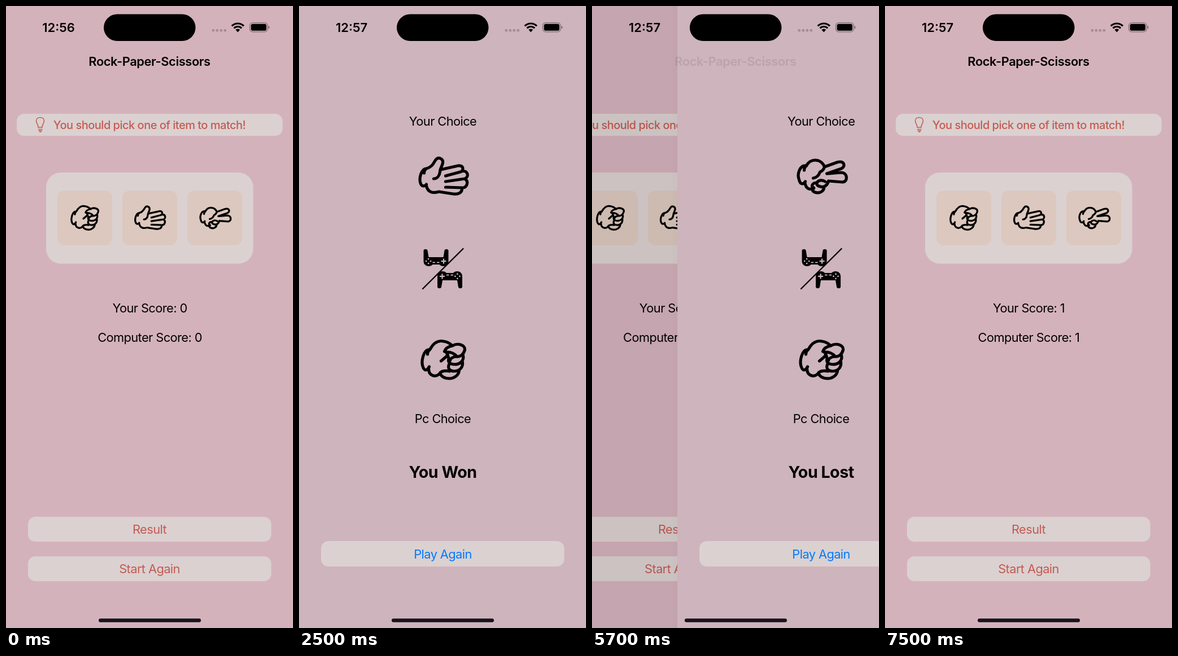
These frames come from a looping animation (508x1102 px, 8000 ms). An HTML page with a canvas:

```html
<!DOCTYPE html>
<html lang="en">
<head>
<meta charset="utf-8">
<title>Rock-Paper-Scissors</title>
<style>
  html, body { margin: 0; width: 100%; height: 100%; overflow: hidden; background: #d4b2bc; }
  canvas { display: block; }
</style>
</head>
<body>
<canvas id="stage" width="508" height="1102"></canvas>
<script>
const W = 508, H = 1102, LOOP = 8000;
const HOME_BG = '#d4b2bc', RESULT_BG = '#ceb4bc', CARD = '#dbd1d1', TILE = '#dcc8be', RED = '#c45b52', BLUE = '#007aff';
const ctx = document.getElementById('stage').getContext('2d');

// Hands are outlines around their own centre, at the size of the result page.
const rock = new Path2D(`M-24-18C-17-31-8-35 0-33C8-32 13-28 16-25C26-31 39-26 38-18C36-10 30-5 24-6C20-11 14-14 6-14
  M16-25C10-24 4-21 2-15C8-13 9-8 3-4L-4 2M6-14C9-8 8-2 12 1M24-6C19-6 15-4 12-1
  M35-8C37 2 29 8 20 8C14 8 9 6 9 0M34 4C35 14 28 20 19 20C12 20 7 16 10 8
  M28 19C27 28 18 33 11 33C2 33-4 29-6 23C-2 19 5 19 11 20M-26 16C-26 28-14 32-6 24
  M-24-18C-35-20-41 4-35 15C-32 20-28 18-25 12M-24-18C-27-16-28-13-28-10`);
const paper = new Path2D(`M-30-14C-18-17-17-26-13-30C-9-35 0-32-1-24C-2-18-6-14-6-8C-7-1-11 4-17 4
  M-5-12L26-19C36-20 37-11 30-8L4-1M32-9C44-12 46 1 38 4L4 9M39 5C45 9 42 20 34 20L4 19
  M33 20C34 29 26 32 18 31L-8 27C-18 30-27 29-30 17
  M-30-14C-39-14-44 4-40 13C-38 18-33 18-30 14M-30-14C-33-12-34-9-34-6`);
const scissors = new Path2D(`M-27-19C-20-33-1-32 5-17L27-25C40-29 43-18 35-14L9-5M12-5L34-7C46-7 47 9 37 10L12 8
  M5-17C3-11 0-9-3-8C-5-2-9 2-15 3M12 8C10 16 4 20-2 18C-8 17-10 14-8 10C-4 6 2 6 6 9
  M-8 11C-17 11-20 18-14 21M4 18C5 26-4 31-12 28C-17 26-18 22-14 20M-30 10C-28 22-22 24-16 21
  M-27-19C-39-21-44-4-40 6C-38 14-33 15-29 9M-27-19C-30-17-31-14-31-11`);
const gamepad = new Path2D(`M-22-13C-21-16-16-16-15-13L-13-1H13L15-13C16-16 21-16 22-13L22 6
  C22 16 10 17 6 12H-6C-10 17-22 16-22 6Z`);
const bulb = new Path2D(`M57 215C57 209 53.5 208 53.5 203.5C53.5 195.5 67.5 195.5 67.5 203.5
  C67.5 208 64 209 64 215ZM57 218.5H64.5M57.5 221H64M59 223H62.5`);

function box(x, y, w, h, r, color) {
  ctx.fillStyle = color;
  ctx.beginPath();
  ctx.roundRect(x, y, w, h, r);
  ctx.fill();
}

function label(str, x, y, { size = 21.8, weight = 400, color = '#000', gap = -0.58, alpha = 1 } = {}) {
  ctx.save();
  ctx.globalAlpha *= alpha;
  ctx.font = `${weight} ${size}px Inter, sans-serif`;
  ctx.letterSpacing = gap + 'px';
  ctx.textAlign = 'center';
  ctx.fillStyle = color;
  ctx.fillText(str, x, y);
  ctx.restore();
}

function hand(path, x, y, scale = 1) {
  ctx.save();
  ctx.translate(x, y);
  ctx.scale(scale, scale);
  ctx.lineWidth = 5.2;
  ctx.lineCap = ctx.lineJoin = 'round';
  ctx.strokeStyle = '#000';
  ctx.stroke(path);
  ctx.restore();
}

function pad(x, y, angle) {
  ctx.save();
  ctx.translate(x, y);
  ctx.rotate(angle);
  ctx.fillStyle = '#000';
  ctx.fill(gamepad);
  ctx.fillStyle = RESULT_BG;
  ctx.fillRect(9, 5, 9, 2.2);
  ctx.fillRect(12.4, 1.6, 2.2, 9);
  ctx.fillRect(-6, 7.5, 4.5, 1.8);
  ctx.fillRect(1.5, 7.5, 4.5, 1.8);
  for (const [dx, dy] of [[-4, 0], [4, 0], [0, -4], [0, 4]]) box(-14.8 + dx, 4.7 + dy, 2.8, 2.8, 1.4, RESULT_BG);
  ctx.restore();
}

const within = (t, from, to) => t >= from && t < to;

const home = (you, computer) => ({
  titled: true,
  draw(t) {
    const dimmed = [false, within(t, 500, 1500), within(t, 4600, 5400)];
    const resultPressed = within(t, 1500, 1700) || within(t, 5400, 5600);
    box(0, 0, W, H, 0, HOME_BG);
    box(19, 191, 470.5, 39, 13, CARD);
    ctx.strokeStyle = RED;
    ctx.lineWidth = 1.6;
    ctx.stroke(bulb);
    label('You should pick one of item to match!', 254, 218, { size: 20, weight: 500, color: RED, gap: -0.5 });
    box(71, 295, 366.5, 161.5, 26, CARD);
    [rock, paper, scissors].forEach((path, i) => {
      ctx.globalAlpha = dimmed[i] ? 0.3 : 1;
      box(91 + 115 * i, 327, 97, 97, 13, TILE);
      hand(path, 139.5 + 115.3 * i, 375.5, 0.63);
    });
    ctx.globalAlpha = 1;
    label('Your Score: ' + you, 254.5, 543);
    label('Computer Score: ' + computer, 254.5, 595);
    box(39, 905, 430.5, 44, 13, CARD);
    label('Result', 254, 935, { color: RED, alpha: resultPressed ? 0.3 : 1 });
    box(39, 975, 430.5, 44, 13, CARD);
    label('Start Again', 254, 1005, { color: RED });
  }
});

const result = (yours, pcs, verdict) => ({
  titled: false,
  draw(t) {
    const pressed = within(t, 3400, 3600) || within(t, 6700, 6900);
    box(0, 0, W, H, 0, RESULT_BG);
    label('Your Choice', 254.5, 212);
    hand(yours, 255.5, 302);
    pad(242.5, 446, 0);
    pad(267, 485, Math.PI);
    ctx.strokeStyle = '#000';
    ctx.lineWidth = 2.4;
    ctx.lineCap = 'round';
    ctx.beginPath();
    ctx.moveTo(219, 501);
    ctx.lineTo(290.5, 430);
    ctx.stroke();
    hand(pcs, 255.5, 627);
    label('Pc Choice', 254.5, 739);
    label(verdict, 254.5, 836, { size: 28.6, weight: 700, gap: -0.5 });
    box(39, 948, 430.5, 45, 13, CARD);
    label('Play Again', 254.5, 979, { color: BLUE, alpha: pressed ? 0.3 : 1 });
  }
});

const views = [home(0, 0), result(paper, rock, 'You Won'), home(1, 0), result(scissors, rock, 'You Lost'), home(1, 1)];
const pushes = [1600, 3617, 5567.5, 6849];

// Critically damped spring: the part of the way still to go.
function remaining(ms) {
  const x = 18.5 * ms / 1000;
  return (1 + x) * Math.exp(-x);
}

function drawView(view, x, t) {
  ctx.save();
  ctx.translate(x, 0);
  view.draw(t);
  ctx.restore();
}

const title = (x, alpha) => label('Rock-Paper-Scissors', 254 + x, 106, { weight: 600, gap: -0.38, alpha });

function statusBar(t) {
  label(t < 2500 ? '12:56' : '12:57', 93, 46, { size: 22, weight: 600, gap: 0 });
  box(173, 14.5, 162.5, 47.5, 23.75, '#000');
  for (let i = 0; i < 4; i++) box(364.5 + 7 * i, 41, 4.6, 4.6, 1.8, 'rgba(0,0,0,.22)');
  ctx.strokeStyle = '#000';
  ctx.lineCap = 'butt';
  ctx.lineWidth = 3.2;
  for (const r of [15, 9.5]) {
    ctx.beginPath();
    ctx.arc(410.3, 46, r, -Math.PI * 0.75, -Math.PI * 0.25);
    ctx.stroke();
  }
  ctx.fillStyle = '#000';
  ctx.beginPath();
  ctx.moveTo(410.3, 46.5);
  ctx.arc(410.3, 46, 5.5, -Math.PI * 0.75, -Math.PI * 0.25);
  ctx.fill();
  ctx.strokeStyle = 'rgba(0,0,0,.4)';
  ctx.lineWidth = 1.3;
  ctx.beginPath();
  ctx.roundRect(431.5, 29.7, 31.5, 16.2, 5.2);
  ctx.stroke();
  box(433.6, 31.8, 27.3, 12, 3.4, '#000');
  box(464.5, 35.3, 1.8, 5, [0, 2, 2, 0], 'rgba(0,0,0,.45)');
  box(164, 1085.3, 181, 6.4, 3.2, '#17131a');
}

function draw(t) {
  const n = pushes.filter(start => start <= t).length;
  const view = views[n], previous = views[n - 1];
  let left = previous ? remaining(t - pushes[n - 1]) : 0;
  if (left < 0.001) left = 0;
  const x = left * W;
  if (left) {
    drawView(previous, -0.3 * (W - x), t);
    box(0, 0, W, H, 0, `rgba(0,0,0,${0.1 * (1 - left)})`);
    const shadow = ctx.createLinearGradient(x - 14, 0, x, 0);
    shadow.addColorStop(0, 'rgba(0,0,0,0)');
    shadow.addColorStop(1, `rgba(0,0,0,${0.05 * left})`);
    box(x - 14, 0, 14, H, 0, shadow);
  }
  drawView(view, x, t);
  if (view.titled) title(0.76 * x, (1 - left) ** 2.5);
  else if (left) title(0, left ** 2);
  statusBar(t);
}

// The screen refreshes ten times a second.
function tick() {
  draw(Math.floor(performance.now() % LOOP / 100) * 100);
  requestAnimationFrame(tick);
}
tick();
</script>
</body>
</html>
```
